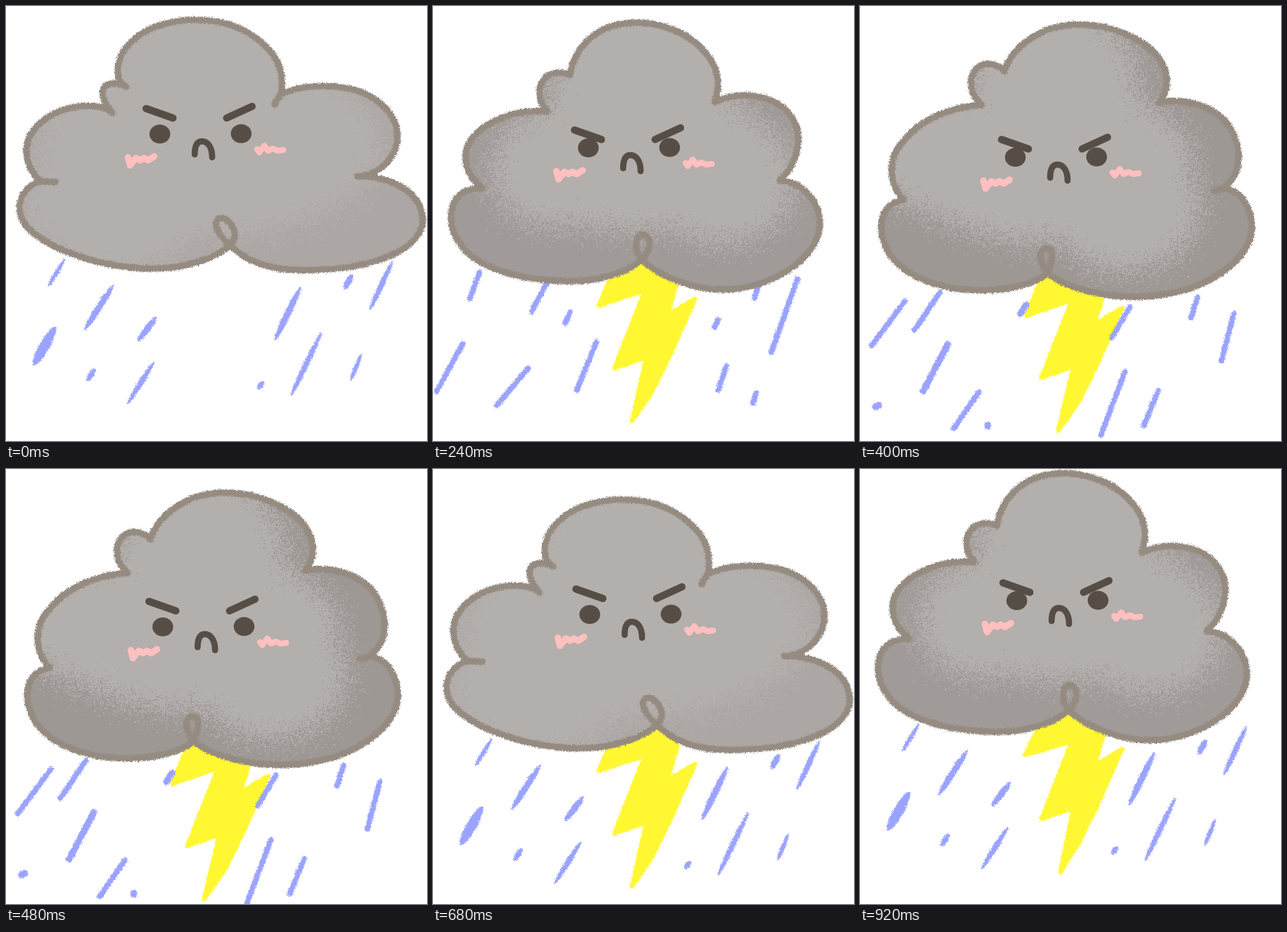
Write an HTML page with a canvas that moves like this. It is 580 by 598 pixels and loops after 0.96 s.

```html
<!DOCTYPE html>
<html lang="en">
<head>
<meta charset="utf-8">
<title>Storm cloud</title>
<style>
html, body { margin: 0; width: 100%; height: 100%; overflow: hidden; background: #fff; }
canvas { display: block; }
</style>
</head>
<body>
<canvas id="stage" width="580" height="598"></canvas>
<script>
const W = 580, H = 598, PAD = 20, LOOP = 960, STEP = 40;
const LINE = '#958b81', FILL = '#b3afac', RAIN = '#9aa3ff', BOLT = '#fef732', INK = '#564e46', BLUSH = '#ffc0bf';

let seed = 7;
function rnd() {
  seed = (seed + 0x6D2B79F5) | 0;
  let r = Math.imul(seed ^ (seed >>> 15), 1 | seed);
  r = (r + Math.imul(r ^ (r >>> 7), 61 | r)) ^ r;
  return ((r ^ (r >>> 14)) >>> 0) / 4294967296;
}

// Moves every pixel by a small random amount: a dry brush edge, or grain when large.
function scatter(ctx, amp) {
  const { width: w, height: h } = ctx.canvas;
  const src = new Uint32Array(ctx.getImageData(0, 0, w, h).data.buffer);
  const img = ctx.createImageData(w, h);
  const out = new Uint32Array(img.data.buffer);
  const shift = () => Math.round((rnd() + rnd() - 1) * amp);
  const clamp = (v, max) => Math.max(0, Math.min(max - 1, v));
  for (let y = 0; y < h; y++)
    for (let x = 0; x < w; x++)
      out[y * w + x] = src[clamp(y + shift(), h) * w + clamp(x + shift(), w)];
  ctx.putImageData(img, 0, 0);
}

function sprite(dy, rough, paint) {
  const c = document.createElement('canvas');
  c.width = W;
  c.height = H + 2 * PAD;
  const ctx = c.getContext('2d', { willReadFrequently: true });
  ctx.translate(0, PAD - dy);
  ctx.lineCap = ctx.lineJoin = 'round';
  paint(ctx);
  if (rough) scatter(ctx, rough);
  return c;
}

function stroke(ctx, d, color, width) {
  ctx.strokeStyle = color;
  ctx.lineWidth = width;
  ctx.stroke(new Path2D(d));
}

function oval(ctx, x, y, rx, ry, turn = 0) {
  ctx.beginPath();
  ctx.ellipse(x, y, rx, ry, turn, 0, 7);
  ctx.fill();
}

function cloud(dy, body, extra, shade, lights) {
  return sprite(dy, 1.8, ctx => {
    const path = new Path2D(body);
    ctx.fillStyle = shade;
    ctx.fillRect(0, -PAD, W, H + 100);
    ctx.fillStyle = FILL;
    lights.forEach(l => oval(ctx, ...l));
    scatter(ctx, 38);
    ctx.globalCompositeOperation = 'destination-in';
    ctx.fill(path);
    ctx.globalCompositeOperation = 'source-over';
    stroke(ctx, body + extra, LINE, 9);
  });
}

const clouds = [
  cloud(0,
    'M309 329C290 345 250 362 200 361C130 360 60 335 30 305C8 280 20 248 48 241' +
    'C28 225 22 195 35 175C55 145 100 130 138 141L147 147C135 135 128 118 138 109C146 104 152 107 159 108' +
    'C150 90 153 70 170 52C195 25 240 16 280 20C330 25 365 55 376 82C382 100 380 110 379 121' +
    'C410 107 450 108 480 115C520 128 542 155 539 185C536 210 515 230 490 234' +
    'C525 234 560 252 570 275C582 305 565 325 540 338C500 360 440 364 400 363C360 362 330 350 309 329Z',
    'M48 241L68 242M157 106L165 111M379 121L370 135M490 234L484 234' +
    'M309 329C296 318 286 304 290 295C296 286 310 295 314 308C317 318 313 325 309 329',
    '#aca7a4', [[280, 190, 240, 130], [265, 100, 130, 110], [150, 270, 130, 100]]),
  cloud(20,
    'M288 349C262 370 220 380 180 378C120 377 60 360 38 328C18 300 20 262 50 252L68 250' +
    'C48 235 38 210 50 188C65 162 110 140 158 145C145 132 142 112 155 98C165 90 178 90 189 95' +
    'C192 65 215 38 245 28C300 12 355 35 380 70C395 92 396 112 388 132' +
    'C420 117 465 120 488 145C515 175 503 215 478 240' +
    'C510 242 534 270 533 302C530 350 460 390 400 390C355 390 310 370 288 349Z',
    'M288 349C276 335 278 317 288 314C299 314 304 330 288 349',
    '#a09b98', [[285, 213, 205, 98], [290, 100, 130, 110], [400, 240, 100, 88], [160, 230, 80, 72]]),
  cloud(33.3,
    'M258 368C235 385 200 392 160 391C110 390 60 372 40 340C22 310 25 272 60 267' +
    'C40 245 38 215 55 192C80 158 120 140 168 136C150 122 148 95 163 84C175 76 190 80 199 90' +
    'C210 55 250 28 295 26C350 24 400 50 415 77C427 98 425 118 412 133' +
    'C450 125 490 140 508 165C530 200 525 235 498 252' +
    'C525 250 540 280 540 305C538 350 480 385 430 395C370 408 295 395 258 368Z',
    'M498 252L487 254M258 368C246 350 246 335 256 333C268 332 266 352 258 368',
    '#9d9894', [[255, 215, 205, 112], [270, 115, 118, 115], [365, 275, 105, 92], [120, 205, 105, 85]])
];

function rain(dy, lens, drops) {
  return sprite(dy, 1.8, ctx => {
    ctx.fillStyle = RAIN;
    for (const [x1, y1, x2, y2, w = 7.5] of drops) {
      if (lens) {
        const dx = x2 - x1, len = y2 - y1;
        oval(ctx, (x1 + x2) / 2, (y1 + y2) / 2, Math.hypot(dx, len) / 2 + 2, w / 2, Math.atan2(len, dx));
      } else {
        stroke(ctx, `M${x1} ${y1}L${x2} ${y2}`, RAIN, w);
      }
    }
  });
}

const rains = [
  rain(0, true, [
    [80, 349, 59, 384, 6], [147, 385, 109, 444, 9], [206, 429, 183, 459, 9], [67, 443, 39, 492, 14],
    [122, 500, 113, 514], [203, 491, 168, 546], [405, 388, 371, 458, 9], [476, 371, 467, 388, 9],
    [532, 352, 502, 416], [434, 450, 393, 535], [489, 480, 475, 514, 6], [354, 517, 348, 525]]),
  rain(33.3, false, [
    [62, 406, 16, 467], [110, 394, 75, 446], [121, 465, 87, 530, 9], [164, 531, 129, 581],
    [26, 549, 21, 551, 9], [176, 576, 176, 578, 9], [229, 411, 221, 423, 9], [372, 414, 347, 456],
    [365, 503, 332, 590], [411, 529, 391, 577], [465, 401, 456, 429], [515, 423, 498, 488]]),
  rain(20, false, [
    [64, 366, 51, 402], [157, 380, 136, 420], [189, 421, 182, 436], [41, 464, 5, 530],
    [131, 498, 88, 549], [225, 462, 198, 528], [502, 375, 466, 476], [449, 383, 443, 401],
    [393, 431, 388, 441], [404, 495, 393, 528], [445, 532, 441, 546]])
];

const bolts = [0, 3, 1, 2].map(k => sprite(20, 1.8, ctx => {
  const d = `M290 340L255 355L243 378L${229 - k / 2} ${413 - k}L292 391L250 498L294 483` +
    `L${273 + k} 571L302 530L328 477L361 402L323 425L337 378L336 350Z`;
  ctx.fillStyle = BOLT;
  ctx.fill(new Path2D(d));
  stroke(ctx, d, BOLT, 6);
}));

const faces = [0, 10.5].map(drop => sprite(0, 0, ctx => {
  stroke(ctx, `M193 ${141 + drop}L230 ${154 + drop}M304 ${154 + drop}L339 ${138 + drop}`, INK, 10);
  ctx.fillStyle = INK;
  oval(ctx, 212, 176, 14.3, 13);
  oval(ctx, 324, 175.5, 14.3, 13);
  stroke(ctx, 'M260 204C260 191 264 186 270 186C278 186 284 194 284 208', INK, 8.5);
  stroke(ctx, 'M168 208L171 219L179 209L185 212L190 209L196 212L204 207', BLUSH, 9);
  stroke(ctx, 'M346 197L349 201L356 192L361 199L368 196L374 199L382 198', BLUSH, 8);
}));
const nudges = [[0, 0], [2, -1.3], [4, 0.7], [4, 1.2]];

const view = document.getElementById('stage').getContext('2d');
const pick = (list, t, hold) => list[Math.floor(t / hold) % list.length];

function draw(now) {
  const t = Math.floor((now % LOOP) / STEP) * STEP;
  const bob = Math.min(t, LOOP - t) / 12;
  const put = (img, x = 0, y = 0) => view.drawImage(img, x, Math.round(bob + y) - PAD);
  view.fillStyle = '#fff';
  view.fillRect(0, 0, W, H);
  if (t > 80) put(pick(bolts, t, 100));
  put(pick(rains, t, 100));
  put(pick(clouds, t, 200));
  put(pick(faces, t, 240), ...pick(nudges, t, 240));
}

function tick(now) {
  draw(now);
  requestAnimationFrame(tick);
}
draw(0);
requestAnimationFrame(tick);
</script>
</body>
</html>
```
